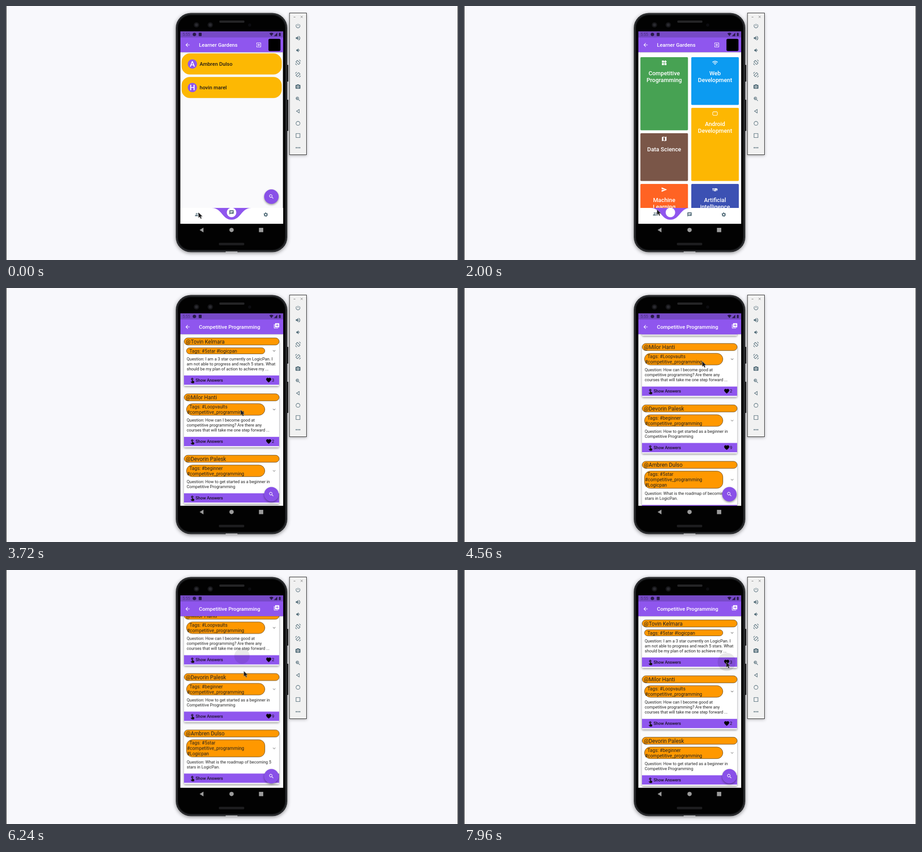
Write an HTML page that moves like this. It is 998 px wide and 561 px high and loops after 8000 ms.

```html
<!DOCTYPE html>
<html lang="en">
<head>
<meta charset="utf-8">
<title>Phone demo</title>
<style>
html, body { margin: 0; width: 100%; height: 100%; overflow: hidden; background: #f8f8fc; }
svg { display: block; width: 100vw; height: 100vh; font-family: Roboto, sans-serif; }
.m { font-weight: 500; }
.card, .fab { filter: drop-shadow(0 2px 2px #0006); }
.phone { filter: drop-shadow(0 2px 4px #0007); }
.panel { filter: drop-shadow(0 2px 3px #0004); }
.a { animation: 8s ease-in-out infinite both; }
#chats { animation-name: chats; animation-timing-function: step-end; }
#topics { animation-name: topics; animation-timing-function: step-end; }
#dip { animation-name: dip; }
#people { animation-name: people; }
#chat { animation-name: chat; }
#forum { animation-name: forum; animation-timing-function: ease-out; }
#cards { animation-name: cards; animation-timing-function: step-end; }
#scroll { animation-name: scroll; }
#cursor { animation-name: cursor; }
#tapTab { animation-name: tapTab; }
#tapTile { animation-name: tapTile; }
#tapDrag { animation-name: tapDrag; }
#tapHeart { animation-name: tapHeart; }

@keyframes chats { 0% { opacity: 1 } 21.5%, 100% { opacity: 0 } }
@keyframes topics { 0% { opacity: 0 } 21.5%, 100% { opacity: 1 } }
@keyframes dip { 0%, 21% { transform: none } 28.5%, 100% { transform: translateX(-75.5px) } }
@keyframes people { 0%, 23% { transform: none } 28.5%, 100% { transform: translateY(-5px) } }
@keyframes chat { 0%, 21% { transform: translateY(-5px) } 26%, 100% { transform: none } }
@keyframes forum {
  0%, 39.5% { opacity: 0; transform: translateY(90px) }
  43.5%, 100% { opacity: 1; transform: none }
}
@keyframes cards { 0% { opacity: 0 } 42.5%, 100% { opacity: 1 } }
@keyframes scroll {
  0%, 49% { transform: none; animation-timing-function: linear }
  57% { transform: translateY(-111px); animation-timing-function: ease-out }
  60.5%, 78% { transform: translateY(-141px); animation-timing-function: linear }
  82% { transform: translateY(-28px); animation-timing-function: ease-out }
  85%, 100% { transform: none }
}
@keyframes cursor {
  0%, 24% { transform: translate(425px, 456px) }
  33%, 39.5% { transform: translate(466px, 191px) }
  45.5%, 49% { transform: translate(518px, 269px); animation-timing-function: linear }
  57% { transform: translate(526px, 162px); animation-timing-function: ease-out }
  60%, 64% { transform: translate(526px, 134px) }
  73%, 75.5% { transform: translate(520px, 186px); animation-timing-function: ease-in }
  78% { transform: translate(525px, 223px); animation-timing-function: linear }
  82%, 85% { transform: translate(529px, 332px) }
  96.5%, 100% { transform: translate(579px, 203px) }
}
@keyframes tapTab { 0%, 20% { opacity: 0 } 21% { opacity: .1 } 24%, 100% { opacity: 0 } }
@keyframes tapTile { 0%, 36.5% { opacity: 0 } 37.5% { opacity: .08 } 39.5% { opacity: .2 } 42%, 100% { opacity: 0 } }
@keyframes tapDrag { 0%, 75.5% { opacity: 0 } 77%, 78% { opacity: .08 } 80%, 100% { opacity: 0 } }
@keyframes tapHeart { 0%, 97.5% { opacity: 0 } 99%, 100% { opacity: .09 } }
</style>
</head>
<body>
<svg id="stage" viewBox="0 0 998 561" preserveAspectRatio="none"></svg>
<script>
const PURPLE = '#8f56ee', SLATE = '#546e7a';

const ICONS = {
  back: 'M20 11H7.83l5.59-5.59L12 4l-8 8 8 8 1.41-1.41L7.83 13H20v-2z',
  exit: 'M10.09 15.59L11.5 17l5-5-5-5-1.41 1.41L12.67 11H3v2h9.67zM19 3H5c-1.11 0-2 .9-2 2v4h2V5h14v14H5v-4H3v4c0 1.1.89 2 2 2h14c1.1 0 2-.9 2-2V5c0-1.1-.9-2-2-2z',
  search: 'M15.5 14h-.79l-.28-.27A6.5 6.5 0 1 0 13.73 14.43l.27.28v.79l5 4.99L20.49 19zm-6 0a4.5 4.5 0 1 1 0-9 4.5 4.5 0 0 1 0 9z',
  people: 'M16 11a3 3 0 1 0-3-3 3 3 0 0 0 3 3zM8 11a3 3 0 1 0-3-3 3 3 0 0 0 3 3zm0 2c-2.33 0-7 1.17-7 3.5V19h14v-2.5c0-2.33-4.67-3.5-7-3.5zm8 0l-.97.05c1.16.84 1.97 1.97 1.97 3.45V19h6v-2.5c0-2.33-4.67-3.5-7-3.5z',
  chat: 'M20 2H4a2 2 0 0 0-2 2v18l4-4h14a2 2 0 0 0 2-2V4a2 2 0 0 0-2-2zM6 9h12v2H6zm8 5H6v-2h8zm4-6H6V6h12z',
  heart: 'M12 21.35l-1.45-1.32C5.4 15.36 2 12.28 2 8.5 2 5.42 4.42 3 7.5 3c1.74 0 3.41.81 4.5 2.09C13.09 3.81 14.76 3 16.5 3 19.58 3 22 5.42 22 8.5c0 3.78-3.4 6.86-8.55 11.54z',
  more: 'M16.59 8.59L12 13.17 7.41 8.59 6 10l6 6 6-6z',
  add: 'M4 6H2v14a2 2 0 0 0 2 2h14v-2H4zm16-4H8a2 2 0 0 0-2 2v12a2 2 0 0 0 2 2h12a2 2 0 0 0 2-2V4a2 2 0 0 0-2-2zm-1 9h-4v4h-2v-4H9V9h4V5h2v4h4z',
  touch: 'M9 11.24V7.5a2.5 2.5 0 0 1 5 0v3.74a4.5 4.5 0 1 0-5 0zm9.84 4.63l-4.54-2.26-.54-.11H13v-6a1.5 1.5 0 0 0-3 0v10.74l-3.43-.72-1.03.3-.79.8 4.94 4.94c.27.27.65.44 1.06.44h6.79c.75 0 1.33-.55 1.44-1.28l.75-5.27c.1-.7-.3-1.3-.89-1.58z',
  wifi: 'M1 9l2 2c4.97-4.97 13.03-4.97 18 0l2-2C16.93 2.93 7.08 2.93 1 9zm8 8l3 3 3-3c-1.65-1.66-4.34-1.66-6 0zm-4-4l2 2c2.76-2.76 7.24-2.76 10 0l2-2C15.14 9.14 8.87 9.14 5 13z',
  widgets: 'M13 13v8h8v-8zM3 21h8v-8H3zM3 3v8h8V3zm13.66-1.31L11 7.34 16.66 13l5.66-5.66z',
  map: 'M20.5 3L15 5.1 9 3 3.36 4.9 3 5.4v15.1l.5.5L9 18.9l6 2.1 5.64-1.9.36-.5V3.5zM15 19l-6-2.11V5l6 2.11z',
  send: 'M2 21l21-9L2 3v7l15 2-15 2z',
  tablet: 'M5 4h14l3 3v10l-3 3H5l-3-3V7zm0 2L4 8v8l1 2h14l1-2V8l-1-2z',
  seat: 'M2 7h5v5H2zm7 0h10l3 3v3H9zM2 14h20v2h-6v2H8v-2H2z',
  power: 'M13 3h-2v10h2zm4.83 2.17l-1.42 1.42a7 7 0 1 1-8.83 0L6.17 5.17a9 9 0 1 0 11.66 0z',
  loud: 'M3 9v6h4l5 5V4L7 9zm13.5 3A4.5 4.5 0 0 0 14 7.97v8.05A4.5 4.5 0 0 0 16.5 12zM14 3.23v2.06a7 7 0 0 1 0 13.42v2.06a9 9 0 0 0 0-17.54z',
  quiet: 'M5 9v6h4l5 5V4L9 9zm13.5 3A4.5 4.5 0 0 0 16 7.97v8.05A4.5 4.5 0 0 0 18.5 12z',
  rotate: 'M9 2l13 12-7 8L2 10zM9 5l-4 5 10 9 4-5zM16 1c4 0 7 3 7 7h-2c0-3-2-5-5-5zM1 16h2c0 3 2 5 5 5v2c-4 0-7-3-7-7z',
  camera: 'M9 2L7.17 4H4a2 2 0 0 0-2 2v12a2 2 0 0 0 2 2h16a2 2 0 0 0 2-2V6a2 2 0 0 0-2-2h-3.17L15 2zm3 15a5 5 0 1 1 0-10 5 5 0 0 1 0 10zm0-2a3 3 0 1 0 0-6 3 3 0 0 0 0 6z',
  left: 'M18 3L4 12l14 9zm-2 3.7v10.6L8 12z',
  ring: 'M12 3a9 9 0 1 0 0 18 9 9 0 0 0 0-18zm0 2a7 7 0 1 1 0 14 7 7 0 0 1 0-14z',
  box: 'M3 3h18v18H3zm2 2v14h14V5z',
  dots: 'M3 9.5h4v5H3zm7 0h4v5h-4zm7 0h4v5h-4z'
};

const rect = (x, y, w, h, fill, r = 0, more = '') =>
  `<rect x="${x}" y="${y}" width="${w}" height="${h}" rx="${r}" fill="${fill}" ${more}/>`;
const circle = (x, y, r, fill, more = '') => `<circle cx="${x}" cy="${y}" r="${r}" fill="${fill}" ${more}/>`;
const text = (s, x, y, size, fill, more = '') =>
  `<text x="${x}" y="${y}" font-size="${size}" fill="${fill}" ${more}>${s}</text>`;
const icon = (name, x, y, size, fill = '#fff', flip = 1) =>
  `<path d="${ICONS[name]}" fill="${fill}" fill-rule="evenodd" transform="translate(${x} ${y}) scale(${flip * size / 24} ${size / 24}) translate(-12 -12)"/>`;
const moving = (id, body) => `<g id="${id}" class="a">${body}</g>`;
const medium = 'class="m"', centred = 'class="m" text-anchor="middle"';

const appBar = title => rect(385, 69, 227, 33, PURPLE, 0, 'style="filter:drop-shadow(0 1px 1px #0003)"') +
  icon('back', 401, 86, 13.5) + text(title, 426, 90, 11.5, '#fff', medium);

const fab = y => `<g class="fab">${circle(586, y, 16, '#8951e8')}</g>` + icon('search', 586, y, 13);

const chatRow = (name, y) => rect(388, y, 220.5, 46, '#fdb803', 18, 'stroke="#f3a900" stroke-width=".5"') +
  circle(411.5, y + 23, 10.3, PURPLE) +
  text(name[0].toUpperCase(), 411.5, y + 29, 17, '#fff', centred) +
  text(name, 427.5, y + 27.3, 11.5, '#211a14', medium);

const tile = (x, y, h, fill, glyph, lines) => rect(x, y, 105, h, fill, 2) + icon(glyph, x + 52.5, y + 12.5, 13.5) +
  lines.map((line, i) => text(line, x + 52.5, y + 39.5 + i * 15, 12.8, '#fff', centred)).join('');

// Lays a post out from its top edge and reports where the next one begins.
function post(y, { name, tags, lines, likes }) {
  const tagTop = y + 21.7, tagHeight = tags.length * 12.2 + 1.3;
  const firstLine = tagTop + tagHeight + 14;
  const foot = firstLine + (lines.length - 1) * 11 + 11.7;
  const outline = 'stroke="#4a3310" stroke-width=".8"';
  const body = `<g class="card">${rect(393, y + 3, 210, foot + 20 - y, '#fff', 2)}</g>` +
    rect(393.5, y, 209.5, 15.6, '#ff9800', 7.8, outline) +
    text('@' + name, 397, y + 12.3, 11.9, '#20201f') +
    rect(398.5, tagTop, 173, tagHeight, '#ff9800', Math.min(13, tagHeight / 2), outline) +
    tags.map((tag, i) => text(tag, i ? 399.5 : 405, tagTop + 10.5 + i * 12.1, 10.3, '#20201f')).join('') +
    icon('more', 592, tagTop + tagHeight / 2, 12, '#777') +
    lines.map((line, i) => text(line, 399, firstLine + i * 11, 9.2, '#222')).join('') +
    rect(393, foot, 210, 20.5, PURPLE) +
    icon('touch', 411.5, foot + 10.5, 13, '#111') +
    text('Show Answers', 418.5, foot + 13.6, 9.2, '#15101f', medium) +
    icon('heart', 580, foot + 10.2, 13.5, '#000') + text(likes, 587, foot + 13.6, 9.2, '#15101f');
  return { body, next: foot + 40.5 };
}

const posts = [
  { name: 'Tovin Kelmara', likes: 3, tags: ['Tags: #5star #logicpan'],
    lines: ['Question: I am a 3 star currently on LogicPan. I', 'am not able to progress and reach 5 stars. What', 'should be my plan of action to achieve my ...'] },
  { name: 'Milor Hanti', likes: 2, tags: ['Tags: #Loopvaults', '#competitive_programming'],
    lines: ['Question: How can I become good at', 'competitive programming? Are there any', 'courses that will take me one step forward ...'] },
  { name: 'Devorin Palesk', likes: 9, tags: ['Tags: #beginner', '#competitive_programming'],
    lines: ['Question: How to get started as a beginner in', 'Competitive Programming'] },
  { name: 'Ambren Dulso', likes: 5, tags: ['Tags: #5star', '#competitive_programming', '#Logicpan'],
    lines: ['Question: What is the roadmap of becoming 5', 'stars in LogicPan.'] }
];
let postTop = 110.3;
const feed = posts.map(p => {
  const { body, next } = post(postTop, p);
  postTop = next;
  return body;
}).join('');

const gear = circle(573.5, 460.7, 2.7, 'none', `stroke="${SLATE}" stroke-width="2"`) +
  circle(573.5, 460.7, 4, 'none', `stroke="${SLATE}" stroke-width="1.5" stroke-dasharray="2.1 2.089"`);

const nav = rect(385, 446, 227, 35, '#fff') +
  moving('dip', `<path d="M454 446C477 446 477 472 498 472S519 446 542 446z" fill="${PURPLE}"/>` + circle(498, 456, 10.5, '#fff')) +
  moving('people', icon('people', 422.5, 460.7, 11.5, SLATE)) +
  moving('chat', icon('chat', 498, 460.9, 11.5, SLATE)) + gear;

const tiles = tile(389.5, 113, 161.5, '#47a253', 'widgets', ['Competitive', 'Programming']) +
  tile(501.8, 113, 105.5, '#0c9bf1', 'wifi', ['Web', 'Development']) +
  tile(501.8, 225, 161.5, '#fdb702', 'tablet', ['Android', 'Development']) +
  tile(389.5, 281, 105.5, '#7a5648', 'map', ['Data Science']) +
  tile(389.5, 393, 90, '#ff6323', 'send', ['Machine', 'Learning']) +
  tile(501.8, 393, 90, '#3c51b3', 'seat', ['Artificial', 'intelligence']);

const home = rect(385, 69, 227, 412, '#fafafc') +
  moving('chats', chatRow('Ambren Dulso', 105) + chatRow('hovin marel', 157) + fab(421)) +
  moving('topics', rect(385, 102, 227, 344, '#fdfdff') + tiles) +
  nav + appBar('Learner Gardens') + icon('exit', 558, 86, 13.5) + rect(579.5, 72.5, 26.5, 27, '#000', 3);

const forum = rect(385, 69, 227, 430, '#fafafc') + moving('cards', moving('scroll', feed)) +
  appBar('Competitive Programming') + icon('add', 597.5, 83.5, 14) + fab(455.5);

const statusBar = rect(385, 56, 227, 13.5, '#774ac6') +
  text('5:55', 390, 66, 8.5, '#4b3180') + circle(416, 62.7, 3.8, '#2b1b4d') +
  rect(425.5, 59, 6.5, 7.5, '#2b1b4d', 1) +
  '<path d="M581.5 60.5q4.5-3 9 0L586 66.5zM599 59v7.5h-7.5zM602.5 60h1v-1h2v1h1v6.5h-4z" fill="#2b1b4d"/>';

const taps = [['tapTab', 423, 459, 15], ['tapTile', 466, 190, 8], ['tapDrag', 521, 190, 17], ['tapHeart', 580, 203, 20]]
  .map(([id, x, y, r]) => circle(x, y, r, '#000', `id="${id}" class="a"`)).join('');

const phone = rect(620, 130, 3.3, 37, '#222', 1) + rect(620, 207, 3.3, 69, '#222', 1) +
  `<g class="phone">${rect(375, 15.5, 246, 528, '#17181a', 33)}</g>` +
  rect(377, 17.5, 242, 524, 'none', 31, 'stroke="#4c4e51" stroke-width="1"') +
  rect(380, 20.5, 236, 518, '#020202', 28) +
  rect(471, 32, 55.5, 5, '#242426', 2) + rect(470, 523, 56, 5.5, '#1d1d1f', 2) +
  [420.5, 451].map(x => circle(x, 41.7, 6, '#151518') + circle(x, 41.7, 3.3, '#2a2a30')).join('') +
  circle(538, 42, 3.5, '#0c0c10') + rect(485, 542.5, 26, 1.5, '#d5d5d8');

const softKeys = '<path d="M436 489.5v10.5l-8.5-5.2z" fill="#9a9a9a"/>' +
  circle(498, 494.7, 4.8, '#9a9a9a') + rect(558.5, 490, 9.5, 9.5, '#9a9a9a');

const tools = ['power', 'loud', 'quiet', 'rotate', 'rotate', 'camera', 'search', 'left', 'ring', 'box', 'dots'];
const panel = `<g class="panel">${rect(626, 15.5, 37.5, 313, '#f1f1f1', 0, 'stroke="#222" stroke-width="1"')}</g>` +
  '<path d="M635 24.5h4M650.5 21.7l4.6 4.6m0-4.6l-4.6 4.6" stroke="#777" stroke-width=".9"/>' +
  tools.map((name, i) => icon(name, 644.7, 44 + i * 26.9, 13, SLATE, i === 4 ? -1 : 1)).join('') +
  `<path d="M641 204h4M643 202v4" stroke="${SLATE}" stroke-width="1"/>`;

const pointer = '<path d="M0 0v12l2.8-2.4 2 4.4 2.2-1-2-4.2H9z" fill="#1a1a1c" stroke="#bbb" stroke-width=".6"/>';

document.getElementById('stage').innerHTML =
  '<clipPath id="screen"><rect x="385" y="56" width="226.5" height="425"/></clipPath>' +
  rect(0, 0, 998, 561, '#f8f8fc') + rect(0, 0, 1, 561, '#111') + rect(997, 0, 1, 561, '#333') +
  phone + panel +
  `<g clip-path="url(#screen)">${home}${moving('forum', forum)}${taps}${statusBar}</g>` +
  softKeys + moving('cursor', pointer);
</script>
</body>
</html>
```
